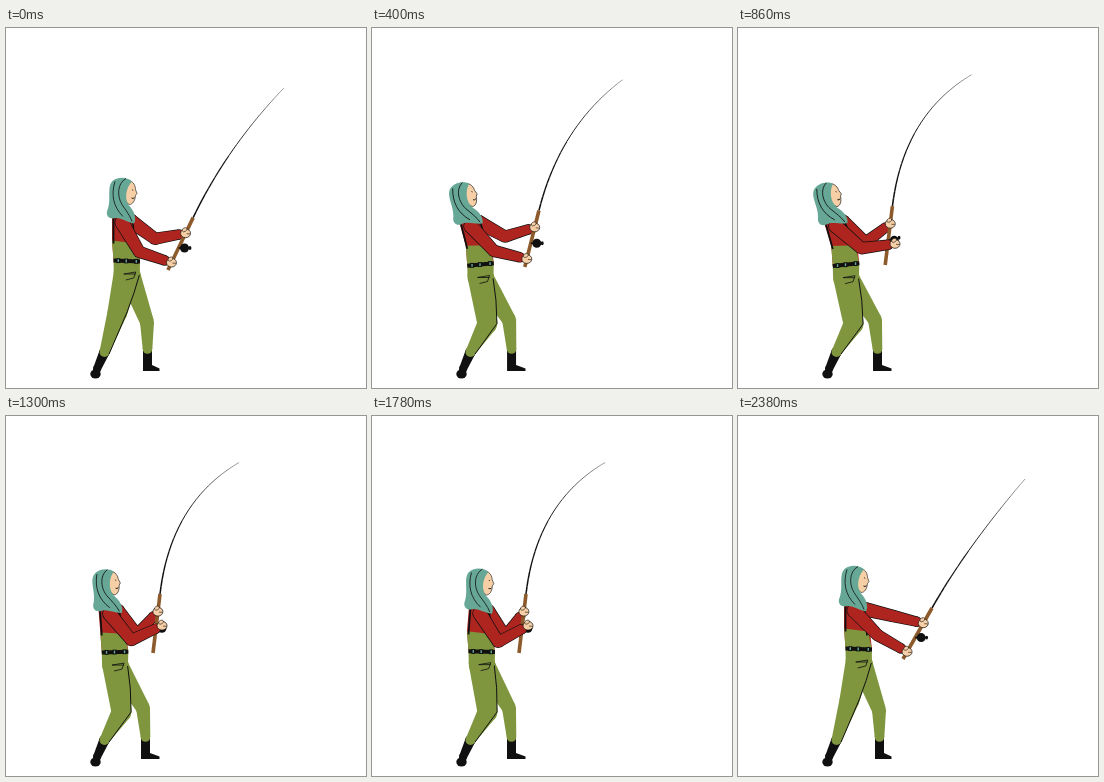
Recreate the animation shown at these times as an HTML page with a canvas. Size 360 by 360 pixels, loop 2.4 s.

```html
<!DOCTYPE html>
<html lang="en">
<head>
<meta charset="utf-8">
<title>Angler</title>
<style>
  html, body { margin: 0; width: 100%; height: 100%; overflow: hidden; background: #fff; }
  canvas { display: block; width: 360px; height: 360px; }
</style>
</head>
<body>
<canvas id="stage" width="360" height="360"></canvas>
<script>
const ctx = document.getElementById('stage').getContext('2d');
const LOOP = 2400;
const RED = '#ae2520', TEAL = '#67a796', GREEN = '#7f963f', SKIN = '#f6cfa6', INK = '#101010', WOOD = '#8d5a2b';

// Rod poses: low after the cast, pulled back, raised
const low = { butt: [165, 243], grip: [194, 192], tip: [287, 63] };
const pulled = { butt: [147, 237], grip: [154, 178], tip: [233, 46.5] };
const raised = { butt: [148.5, 237], grip: [151, 178], tip: [217, 35] };

const clamp = v => Math.min(1, Math.max(0, v));
const ease = (from, to, t) => {
  const k = clamp((t - from) / (to - from));
  return k * k * (3 - 2 * k);
};
const mix = (a, b, k) => a.map((v, i) => v + (b[i] - v) * k);
const add = (p, x, y) => [p[0] + x, p[1] + y];
const polar = (p, r, angle) => add(p, r * Math.cos(angle), r * Math.sin(angle));
const mixRod = (a, b, k) => ({
  butt: mix(a.butt, b.butt, k), grip: mix(a.grip, b.grip, k), tip: mix(a.tip, b.tip, k)
});

function paint(path, fill, line, width = .8) {
  if (fill) { ctx.fillStyle = fill; ctx.fill(path); }
  if (line) { ctx.strokeStyle = line; ctx.lineWidth = width; ctx.stroke(path); }
}
function poly(...points) {
  const path = new Path2D();
  points.forEach(p => path.lineTo(...p));
  return path;
}
function oval([x, y], rx, ry = rx, angle = 0) {
  const path = new Path2D();
  path.ellipse(x, y, rx, ry, angle, 0, 7);
  return path;
}

// Tapered limb through joints, each with its own radius
function limb(joints, radii, fill, grow = 0) {
  joints.forEach((p, i) => {
    const r = radii[i] + grow;
    paint(oval(p, r), fill);
    if (!i) return;
    const q = joints[i - 1], s = radii[i - 1] + grow;
    const side = Math.atan2(p[1] - q[1], p[0] - q[0]) + Math.PI / 2;
    paint(poly(polar(q, s, side), polar(p, r, side), polar(p, -r, side), polar(q, -s, side)), fill);
  });
}

// The elbow hangs below the line from shoulder to hand
function arm(shoulder, hand, bone) {
  const dx = hand[0] - shoulder[0], dy = hand[1] - shoulder[1], reach = Math.hypot(dx, dy);
  const sag = Math.sqrt(Math.max(0, bone * bone - reach * reach / 4)) / reach;
  const elbow = add(mix(shoulder, hand, .5), -dy * sag, dx * sag);
  const joints = [shoulder, elbow, mix(elbow, hand, .8)], radii = [7, 5.8, 4.8];
  limb(joints, radii, INK, .4);
  limb(joints, radii, RED, -.3);
}

function fist(p) {
  paint(oval(p, 5, 4.4), SKIN, INK, .7);
  paint(oval(add(p, -1, -3.6), 2.6, 1.8, -.5), SKIN, INK, .6);
  paint(poly(add(p, 1, .4), add(p, 4.5, .6)), null, INK, .6);
}

const hood = new Path2D('M11-9C6-14-4-14-9-9C-14-3-10 8-13 18C-16 24-13 28-8 28C-2 26 4 31 13 33C16 28 13 20 8 15C3 8 5-3 11-9Z');
const folds = new Path2D('M5-12C-4-7-4 6 1 14C5 20 9 25 11 31M-6-9C-10 4-8 16 2 26');
const face = new Path2D('M8-10C13-9 14.5-4 14.5-1L16 3L14.5 5C14 10 12 14 8 14C1 9 1-4 8-10Z');
const features = new Path2D('M11.5-1L11.8 0M10.5 7.5Q12 8.6 13.5 7.2');

function drawHead([x, y], tilt) {
  ctx.save();
  ctx.translate(x, y);
  ctx.rotate(tilt);
  paint(face, SKIN, INK, .6);
  paint(features, null, INK, .9);
  paint(hood, TEAL);
  paint(folds, null, INK);
  ctx.restore();
}

function drawLegs(left, right, stance) {
  const waist = mix(left, right, .5), hip = add(waist, 0, 12);
  const backKnee = mix([111.5, 284], [115.5, 296], stance), backAnkle = [98.5, 324];
  const frontKnee = mix([141, 294], [137, 292], stance), frontAnkle = mix([141.5, 321], [139.5, 321], stance);
  const sole = add(frontAnkle, 0, 22);

  limb([backAnkle, [91, 341]], [5.2, 4], INK);
  paint(oval([89.5, 346], 5.2, 4.6), INK);
  paint(poly(add(frontAnkle, -4.5, 0), add(frontAnkle, 4.5, 0), add(sole, 4.5, -6), [153.5, 340.5], [153.5, 343], add(sole, -4.5, 0)), INK);

  limb([add(waist, 3, 15), frontKnee, frontAnkle], [11, 7, 4.8], GREEN);
  limb([hip, backKnee, backAnkle], [13, 10, 5], GREEN);
  paint(poly(left, right, add(hip, 13, 0), add(hip, -13, 0)), GREEN);
  paint(poly(add(hip, 12.6, 2), add(mix(hip, backKnee, .5), 12, 0), add(backKnee, 9.6, 0), add(backAnkle, 4.6, 2)), null, INK, 1);
  paint(poly(add(waist, 9, 13), add(waist, -3, 13), add(waist, 9, 11), add(waist, 7, 17), add(waist, -1, 19)), null, INK);
}

function drawBelt(left, right) {
  paint(poly(left, right), null, INK, 4);
  for (const k of [.18, .48, .86]) {
    const p = mix(left, right, k);
    paint(poly(add(p, 0, -2.4), add(p, 0, 2.4)), null, INK, 4);
    paint(poly(add(p, 0, -1.4), add(p, 0, 1.4)), null, TEAL, 1.4);
  }
}

function drawRod({ butt, grip, tip }, bend, reel, turn) {
  const steps = 24;
  for (let i = 0, from = grip; i < steps; i++) {
    const k = (i + 1) / steps, to = mix(mix(grip, bend, k), mix(bend, tip, k), k);
    paint(poly(from, to), null, INK, 1.6 - 1.2 * k);
    from = to;
  }
  paint(poly(butt, grip), null, WOOD, 3.6);
  const knob = polar(reel, 5.5, turn);
  paint(poly(add(reel, -6, 0), reel, knob), null, INK, 1.6);
  paint(oval(reel, 4.5), INK);
  paint(oval(knob, 1.4, 1.9), INK);
}

function draw(t) {
  const release = ease(2160, 2380, t);
  const stance = ease(0, 450, t) * (1 - release);
  const lean = ease(0, 620, t) * (1 - clamp((t - 660) / 1500)) ** 1.8;
  const pull = (.17 + .83 * Math.sin(clamp(t / 960) * Math.PI / 2)) * (1 - release);
  const winding = ease(560, 1000, t) * (1 - ease(1860, 2150, t));
  const turn = clamp((t - 640) / 1440) * 12 * Math.PI;

  const tilt = -.39 * lean;
  const head = add(mix([115, 162.5], [108, 165], stance), -27 * lean, 3.5 * lean);
  const left = add(mix([107.5, 232.5], [96.7, 235], stance), -2.5 * lean, 4 * lean);
  const right = add(left, 26.5, 1 - 5 * lean);
  const fromHead = (x, y) => polar(polar(head, x, tilt), y, tilt + Math.PI / 2);

  const rod = mixRod(low, mixRod(pulled, raised, ease(1800, 2160, t)), pull);
  const bend = mix(rod.butt, rod.grip, 2.2 + .35 * Math.sqrt(pull));
  const reel = add(mix(rod.butt, rod.grip, .42), 6, 0);
  const farHand = mix(rod.butt, rod.grip, .7);
  const nearHand = mix(mix(rod.butt, rod.grip, .14), polar(add(reel, 0, 1.5), 4, turn), winding);

  ctx.clearRect(0, 0, 360, 360);
  ctx.lineJoin = 'round';
  arm(fromHead(9, 30), farHand, 31);

  const nape = fromHead(-9, 20), bibBack = add(left, -1.5, -20), bibFront = add(right, -4, -18);
  paint(poly(left, bibBack, nape, fromHead(12, 27), add(bibFront, 2, 0), right), RED);
  drawLegs(left, right, stance);
  paint(poly(left, bibBack, bibFront, right), GREEN);
  paint(poly(add(nape, 1.5, 0), add(bibBack, 1.5, 3)), null, INK, 1.8);
  paint(poly(fromHead(11, 22), add(bibFront, -1, 4)), null, INK, 1.6);
  drawBelt(left, right);

  drawRod(rod, bend, reel, turn);
  fist(farHand);
  arm(fromHead(1, 32), nearHand, 34);
  fist(nearHand);
  drawHead(head, tilt);
}

const start = performance.now();
function tick() {
  draw((performance.now() - start) % LOOP);
  requestAnimationFrame(tick);
}
tick();
</script>
</body>
</html>
```
